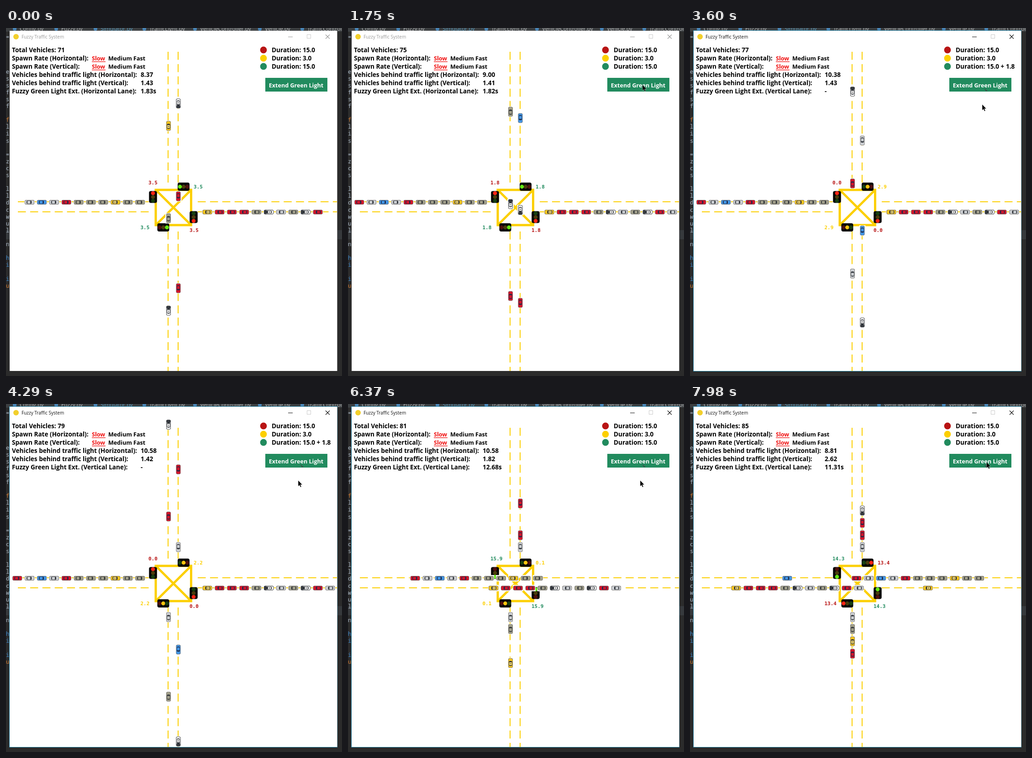
Animation, 736 px wide and 761 px high, one loop 8 s. Source, as an HTML page with a canvas:

```html
<!DOCTYPE html>
<html lang="en">
<head>
<meta charset="utf-8">
<title>Fuzzy Traffic System</title>
<style>
  html, body { margin: 0; width: 100%; height: 100%; overflow: hidden; background: #2b2b2b; }
  canvas { display: block; }
</style>
</head>
<body>
<canvas id="stage" width="736" height="761"></canvas>
<script>
const ctx = document.getElementById('stage').getContext('2d');

const LOOP = 8000, STEP = 77;
const RED = '#b81414', YELLOW = '#fccf00', GREEN = '#218b5e';
const UI = 'bold 13.6px "Open Sans", "Noto Sans", sans-serif';
const UI_SMALL = 'bold 12.6px "Open Sans", "Noto Sans", sans-serif';
const MONO = 'bold 11px "DejaVu Sans Mono", monospace';
const CODE = '12px "Noto Sans Mono", monospace';

// Values measured at these simulation steps; linear in between.
const STEPS = [0, 23, 38, 56, 73, 93, 104];
const TRAVEL = [0, 233, 385, 573, 747, 948, 1065];
const WAIT_H = [8.37, 9, 10.19, 10.58, 10.84, 10.32, 8.81];
const WAIT_V = [1.43, 1.41, 1.44, 1.42, 1.5, 2.14, 2.62];
const EXTENSION = [1.83, 1.82, 1.83, 1.83, 13.01, 12.36, 11.31];
const SPAWNS = [[9, 4], [29, 2], [48, 2], [67, 2], [87, 4]];
const YELLOW_AT = 3.52, RED_AT = 6.5, GO_AT = 5.44;
const CLICK_STEP = 26, GO_TRAVEL = 725;

const PAINT = { r: '#d5142b', o: '#a3a18c', s: '#cdd0d4', b: '#4296e6', y: '#f9c61c', p: '#fbfbfb' };

// Each car: paint, start position, optional stop position.
const DOWN = [['r', 569], ['r', 368], ['p', 165], ['b', -36],
  ['s', -233, 313], ['r', -430, 287], ['r', -630, 260], ['p', -827, 233]];
const UP = [['y', 214], ['o', 416], ['p', 618], ['r', 819],
  ['s', 1016, 466], ['o', 1213, 492], ['y', 1414, 519], ['r', 1610, 546]];
const EAST_QUEUE = 'rsbsroooyoo', WEST_QUEUE = 'yrrropsoprs';

function interpolate(xs, ys, x) {
  let i = 1;
  while (i < xs.length - 1 && x > xs[i]) i++;
  const k = Math.min(1, Math.max(0, (x - xs[i - 1]) / (xs[i] - xs[i - 1])));
  return ys[i - 1] + (ys[i] - ys[i - 1]) * k;
}

function rect(x, y, w, h, color) {
  ctx.fillStyle = color;
  ctx.fillRect(x, y, w, h);
}

function rounded(x, y, w, h, r, color) {
  ctx.fillStyle = color;
  ctx.beginPath();
  ctx.roundRect(x, y, w, h, r);
  ctx.fill();
}

function disc(x, y, r, color) {
  ctx.fillStyle = color;
  ctx.beginPath();
  ctx.arc(x, y, r, 0, 7);
  ctx.fill();
}

function line(points, color, width, dash = []) {
  ctx.strokeStyle = color;
  ctx.lineWidth = width;
  ctx.setLineDash(dash);
  ctx.beginPath();
  points.forEach(([x, y]) => ctx.lineTo(x, y));
  ctx.stroke();
  ctx.setLineDash([]);
}

function text(str, x, y, color = '#000', font = UI) {
  ctx.font = font;
  ctx.fillStyle = color;
  ctx.fillText(str, x, y);
}

function drawEditor() {
  rect(0, 0, 736, 761, '#2b2b2b');
  rect(0, 0, 736, 8, '#3c3f41');
  const tabs = [['Config.py', 30], ['Fuzzy.py', 121], ['Simulator.py', 207], ['TrafficLight.py', 314],
    ['VehicleController.py', 425], ['Vehicle.py', 567], ['TrafficController.py', 660]];
  tabs.forEach(([name, x], i) => {
    disc(x - 11, 2, 4, '#4a86b8');
    text(name, x, 6, i === 2 ? '#5a9fc4' : '#b8babc', '12px "Open Sans", sans-serif');
  });
  rect(0, 442, 8, 20, '#36393c');
  rect(726, 442, 10, 20, '#36393c');
  const scraps = ['=', '', '', '', '', 'e', 's', 's', 'f', 's', 'f', '', 'f', 'l', 'i', 's', '',
    '=', 'z', 'c', 's', '', 'l', 'l', 'd', 'c', 'w', 'u', 'l', '', 'n', '', 'h', 'i', '', 'i', 'u'];
  scraps.forEach((s, i) => {
    const color = i === 12 || i === 36 ? '#cc7832' : i > 31 ? '#3d85c6' : '#a9b7c6';
    text(s, 0, 24 + i * 15.1, color, CODE);
  });
}

function drawWindow(active) {
  if (active) rect(7, 5, 719, 746, '#2384a8');
  rect(8, 6, 717.5, 744, '#fff');
  const ink = active ? '#111' : '#999';
  disc(22, 19, 6, '#f2cf2c');
  text('Fuzzy Traffic System', 34, 23, ink, '10px "Open Sans", "Noto Sans", sans-serif');
  line([[618, 19.5], [628, 19.5]], ink, 1);
  ctx.strokeStyle = '#ccc';
  ctx.strokeRect(659.5, 14.5, 8, 8);
  line([[700, 14.5], [709, 23.5]], ink, 1.1);
  line([[709, 14.5], [700, 23.5]], ink, 1.1);
}

function drawRoads() {
  const dash = [17.5, 9.4];
  for (const x of [355, 377]) {
    line([[x, 52], [x, 338]], YELLOW, 2, dash);
    line([[x, 445], [x, 750]], YELLOW, 2, dash);
  }
  for (const y of [380, 402]) {
    line([[26, y], [313, y]], YELLOW, 2, dash);
    line([[420, y], [725, y]], YELLOW, 2, dash);
  }
  ctx.strokeStyle = YELLOW;
  ctx.lineWidth = 5;
  ctx.strokeRect(328, 354, 77.5, 77);
  line([[328, 354], [405.5, 431]], YELLOW, 5);
  line([[405.5, 354], [328, 431]], YELLOW, 5);
}

// Lamps run red, yellow, green along (dx, dy).
function drawLight(x, y, dx, dy, lit) {
  const w = dx ? 26 : 17.5, h = dx ? 18 : 26;
  rounded(x - w / 2, y - h / 2, w, h, 4, '#050505');
  const on = ['#ff2414', '#ffc610', '#62e812'], off = ['#4e100c', '#4a3c0c', '#173f10'];
  [-1, 0, 1].forEach((k, i) => disc(x + k * dx * 8, y + k * dy * 8.3, 4.3, (i === lit ? on : off)[i]));
}

function drawCar(x, y, angle, kind) {
  ctx.save();
  ctx.translate(x, y);
  ctx.rotate(angle);
  rect(-11.5, -7, 23, 14, '#fff');
  rounded(-10.5, -5, 21, 10, 3, kind === 'p' ? '#15181c' : '#66635f');
  rounded(-9.7, -4.3, 19.4, 8.6, 2.5, PAINT[kind]);
  if (kind === 'p') rounded(4, -4.2, 6, 8.4, 2, '#34383e');
  rounded(-6.5, -3.5, 11, 7, 2, kind === 'r' || kind === 'b' ? '#1f2a48' : '#2c3036');
  rect(-4.7, -2.8, 6.4, 5.6, kind === 'y' ? '#fbe07a' : PAINT[kind]);
  if (kind === 'p' || kind === 'y') rect(-2, -1.5, 1.2, 3, '#333');
  ctx.restore();
}

function drawTraffic(n, travel) {
  const moved = Math.max(0, travel - GO_TRAVEL);
  for (const [kind, start, stop = 740] of DOWN) {
    const y = start + travel;
    if (y >= 54 && (y <= 742 || stop < 740)) drawCar(377.5, Math.min(y, stop), Math.PI / 2, kind);
  }
  for (const [kind, start, stop = 40] of UP) {
    const y = start - travel;
    if (y <= 730.5 && (y >= 42 || stop > 40)) drawCar(356, Math.max(y, stop), -Math.PI / 2, kind);
  }
  const east = (x, kind) => drawCar(x, 381, 0, kind);
  const west = (x, kind) => drawCar(x, 402.5, Math.PI, kind);
  [...EAST_QUEUE].forEach((kind, i) => {
    if (i > 0 || n >= 9) east(24.7 + 26.9 * i + moved, kind);
  });
  [...WEST_QUEUE].forEach((kind, i) => {
    if (i < 10 || n >= 9) west(441 + 26.9 * i - moved, kind);
  });
  if (n >= 87) {
    east(travel - 852, 'b');
    west(1586 - travel, 'y');
  }
}

function drawSignals(t) {
  const phaseV = t < YELLOW_AT ? 2 : t < RED_AT ? 1 : 0;
  const phaseH = t < GO_AT ? 0 : 2;
  drawLight(322, 369.5, 0, 1, phaseH);
  drawLight(411, 413.5, 0, -1, phaseH);
  drawLight(389, 347, -1, 0, phaseV);
  drawLight(344.5, 436, 1, 0, phaseV);

  const colors = [RED, YELLOW, GREEN];
  const leftV = ([21.41, RED_AT, YELLOW_AT][phaseV] - t).toFixed(1);
  const leftH = Math.max(0, (phaseH ? 22.27 : YELLOW_AT) - t).toFixed(1);
  text(leftH, 312, 342, colors[phaseH], MONO);
  text(leftH, 402, 446, colors[phaseH], MONO);
  text(leftV, 411, 351, colors[phaseV], MONO);
  text(leftV, 294.5, 440, colors[phaseV], MONO);
}

function drawPanel(n, t) {
  const total = SPAWNS.reduce((sum, [at, count]) => sum + (n >= at ? count : 0), 71);
  text('Total Vehicles: ' + total, 13, 53);
  ['Horizontal', 'Vertical'].forEach((lane, i) => {
    const y = 71 + 18 * i;
    text(`Spawn Rate (${lane}):`, 13, y);
    text('Slow', 188, y, '#f01010', UI_SMALL);
    rect(188, y + 2, 30, 1.3, '#f01010');
    text('Medium Fast', 224, y, '#000', UI_SMALL);
    text(`Vehicles behind traffic light (${lane}):`, 13, y + 36);
    text(interpolate(STEPS, i ? WAIT_V : WAIT_H, n).toFixed(2), 295, y + 36);
  });
  const pending = t >= YELLOW_AT && t < GO_AT;
  text(`Fuzzy Green Light Ext. (${t < YELLOW_AT ? 'Horizontal' : 'Vertical'} Lane):`, 13, 143);
  text(pending ? '-' : interpolate(STEPS, EXTENSION, n).toFixed(2) + 's', 295, 143);

  const extended = n >= CLICK_STEP && t < GO_AT;
  [[RED, '15.0'], [YELLOW, '3.0'], [GREEN, extended ? '15.0 + 1.8' : '15.0']].forEach(([color, value], i) => {
    disc(564, 48 + 18 * i, 7.4, color);
    text('Duration: ' + value, 582, 53 + 18 * i);
  });
  rect(568, 109, 136, 30, GREEN);
  ctx.textAlign = 'center';
  text('Extend Green Light', 635.5, 130, '#fff', UI_SMALL);
  ctx.textAlign = 'left';
}

function drawCursor(n) {
  if (n >= 31) {
    ctx.fillStyle = '#3c4e48';
    ctx.beginPath();
    [[644, 131], [652, 138], [648, 138]].forEach(([x, y]) => ctx.lineTo(x, y));
    ctx.fill();
  }
  if (n < 17) return;
  const when = [17, 20, 30, 34, 100, 104];
  const x = interpolate(when, [638, 645, 645, 640, 640, 649.5], n);
  const y = interpolate(when, [160, 124, 124, 167, 167, 127], n);
  ctx.save();
  ctx.translate(x, y);
  ctx.beginPath();
  [[0, 0], [0, 13], [3, 10.4], [5, 15], [7, 14], [5, 9.6], [9, 9.4]].forEach(([px, py]) => ctx.lineTo(px, py));
  ctx.closePath();
  ctx.fillStyle = '#000';
  ctx.fill();
  ctx.strokeStyle = 'rgba(255,255,255,.7)';
  ctx.lineWidth = 0.6;
  ctx.stroke();
  ctx.restore();
}

function draw(now) {
  const n = Math.floor((now % LOOP + 30) / STEP);
  const t = Math.max(0, n * STEP - 23) / 1000;
  drawEditor();
  drawWindow(n >= CLICK_STEP);
  ctx.save();
  ctx.beginPath();
  ctx.rect(8, 6, 717.5, 744);
  ctx.clip();
  drawRoads();
  drawSignals(t);
  drawTraffic(n, interpolate(STEPS, TRAVEL, n));
  drawPanel(n, t);
  drawCursor(n);
  ctx.restore();
}

const started = performance.now();
function tick() {
  draw(performance.now() - started);
  requestAnimationFrame(tick);
}
tick();
</script>
</body>
</html>
```
